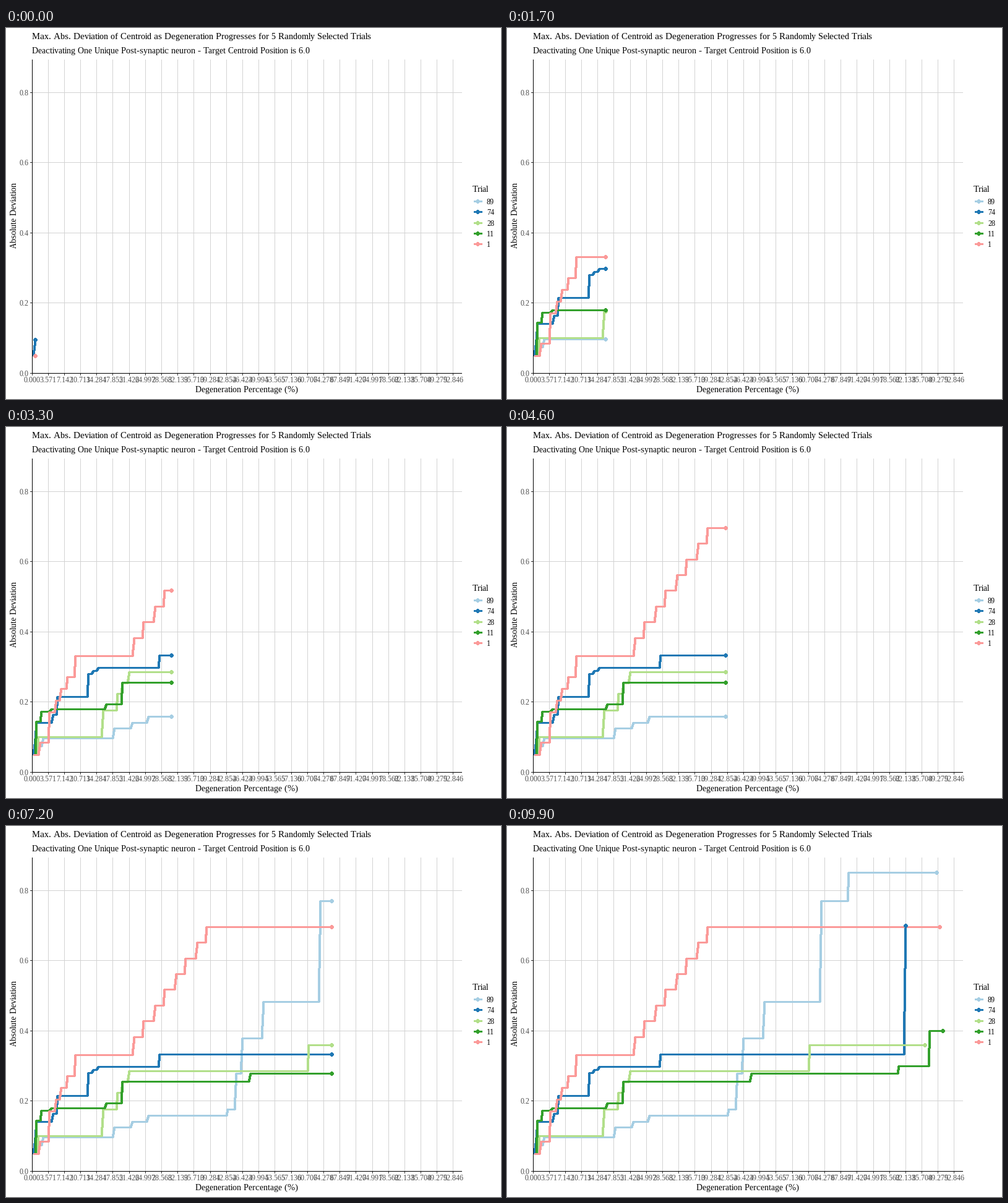
Write a matplotlib script that moves like this. It is 800 px wide and 600 px high and loops after 10000 ms.

```python
import numpy as np
import matplotlib.pyplot as plt
from matplotlib.animation import FuncAnimation
from matplotlib.patches import Circle

W, H, DPI = 800, 600, 100
FRAMES, INTERVAL = 100, 100
PT = 72 / DPI                      # points per pixel
X0, STEP = 42, 2.6192              # left edge, pixels per degeneration step
Y0, UNIT = 558.5, 567.7            # baseline, pixels per unit of deviation
TOP, RIGHT = 51, 736
LAST = 253

# Full hinting on whole pixels keeps the small serif text crisp.
plt.rcParams.update({"font.family": "Liberation Serif",
                     "text.hinting": "native", "text.hinting_factor": 1})

# Colour, final step, then landings: (step, level[, stairs leading to it]).
TRIALS = {
    "89": ("#A6CEE3", 249, [(7, .097, 2), (51, .125), (72, .158, 2),
                            (121, .177), (130, .378, 2), (143, .482),
                            (178, .769), (195, .85)]),
    "74": ("#1F78B4", 230, [(3, .141, 2), (13, .164), (16, .215), (35, .28),
                            (41, .297, 2), (79, .333), (230, .699)]),
    "28": ("#B2DF8A", 242, [(4, .10), (44, .177), (53, .223),
                            (60, .285, 2), (171, .359)]),
    "11": ("#33A02C", 253, [(3, .145), (6, .172), (12, .179), (46, .193),
                            (56, .255), (135, .278), (226, .30), (245, .40)]),
    "1": ("#FB9A99", 251, [(5, .0845), (11, .17), (22, .271, 3), (27, .331),
                           (63, .383), (108, .696, 7)]),
}


def px(k):
    return X0 + STEP * k


def py(v):
    return Y0 - UNIT * v


def pixel(a):
    """Centre of the pixel that holds each coordinate."""
    return np.floor(a) + 0.5


def climb(landings, end):
    """Level at every step, rising in evenly spaced stairs to each landing."""
    level = np.full(end + 1, 0.05)
    k0, v0 = 1, 0.05
    for k, v, *stairs in landings:
        n = stairs[0] if stairs else 1
        for t in np.arange(1, n + 1) / n:
            level[round(k0 + (k - k0) * t):] = v0 + (v - v0) * t
        k0, v0 = k, v
    return level[1:]


fig = plt.figure(figsize=(W / DPI, H / DPI), dpi=DPI, facecolor="white")
ax = fig.add_axes([0, 0, 1, 1])
ax.set_xlim(0, W)
ax.set_ylim(H, 0)
ax.axis("off")


def stroke(x, y, color, width=3, z=3, cap="butt"):
    return ax.plot(pixel(x), pixel(y), color=color, lw=width * PT, zorder=z,
                   antialiased=False, snap=False, solid_capstyle=cap,
                   solid_joinstyle="round")[0]


def rule(x, y, color, z):
    stroke(x, y, color, 1, z, "projecting")


def dot(x, y, color):
    return ax.add_patch(Circle((pixel(x), pixel(y)), 2.6, color=color, lw=0,
                               zorder=4, antialiased=False))


def label(x, y, text, size, color="black", **kw):
    ax.text(x, y, text, fontsize=size * PT, color=color, va="baseline", **kw)


# Grid, ticks and tick labels
for v in np.arange(5) * 0.2:
    y = np.floor(py(v))
    rule([X0, RIGHT], [y, y], "lightgrey", 1)
    rule([X0 - 3, X0], [y, y], "#333333", 5)
    label(37, y + 5, f"{v:.1f}", 12, "#4D4D4D", ha="right")
for i in range(27):
    x = px(10 * i)
    rule([x, x], [TOP, Y0], "lightgrey", 2)
    rule([x, x], [Y0, Y0 + 3], "#333333", 5)
    label(x, 573, f"{3.571 * i:.3f}", 12, "#4D4D4D", ha="center")
rule([X0, X0], [TOP, Y0], "black", 6)
rule([X0, RIGHT], [Y0, Y0], "black", 6)

# Titles
label(42, 18, "Max. Abs. Deviation of Centroid as Degeneration Progresses "
      "for 5 Randomly Selected Trials", 15)
label(42, 41, "Deactivating One Unique Post-synaptic neuron - "
      "Target Centroid Position is 6.0", 14)
label(389, 589, "Degeneration Percentage (%)", 14, ha="center")
label(17, 303.5, "Absolute Deviation", 14, ha="center",
      rotation=90, rotation_mode="anchor")

# Legend and curves
label(754, 265, "Trial", 14)
curves = []
for i, (name, (color, end, landings)) in enumerate(TRIALS.items()):
    y = 280.6 + 17.28 * i
    stroke([756, 769], [y, y], color)
    dot(762, y, color)
    label(777, np.floor(y) + 5, name, 12)
    xs = pixel(px(np.arange(1, end + 1)))
    ys = pixel(py(climb(landings, end)))
    curves.append((xs, ys, stroke(xs, ys, color), dot(xs[0], ys[0], color)))


def update(frame):
    shown = 1 + int((frame + 0.5) * (LAST - 1) / (FRAMES - 1))
    artists = []
    for xs, ys, line, head in curves:
        n = min(shown, len(xs))
        line.set_data(xs[:n], ys[:n])
        head.set_center((xs[n - 1], ys[n - 1]))
        artists += [line, head]
    return artists


anim = FuncAnimation(fig, update, frames=FRAMES, interval=INTERVAL,
                     repeat=True, repeat_delay=0, blit=False)
plt.show()
```
